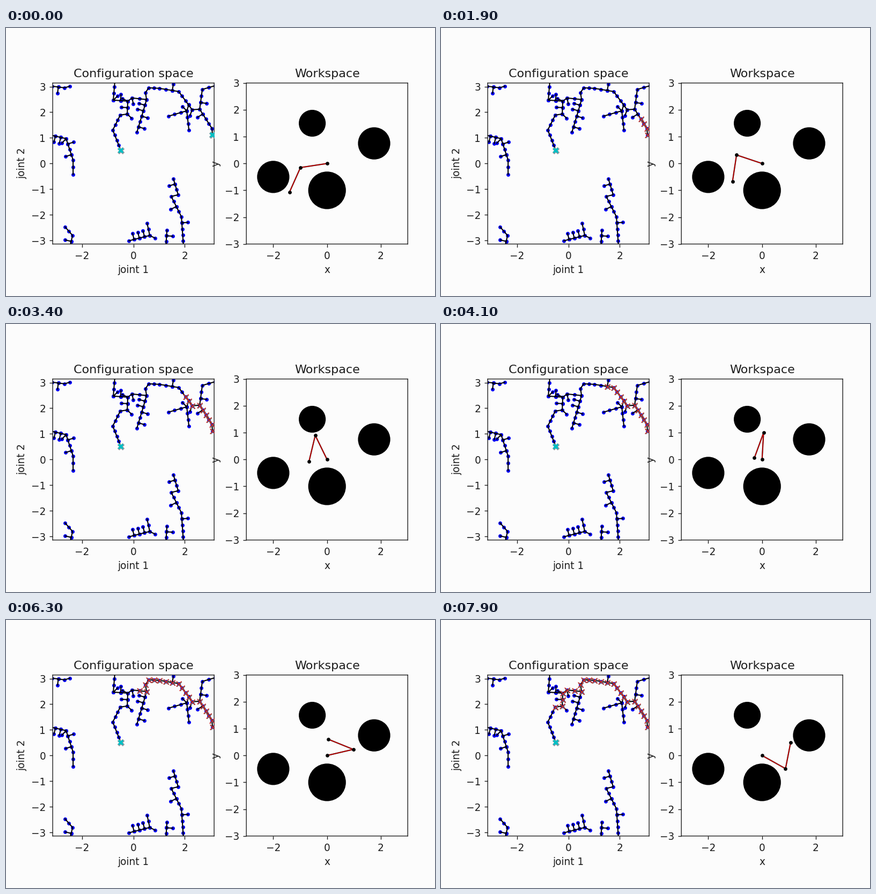
These frames come from a looping animation (800 px wide and 501 px high, 8 s). A matplotlib script:

```python
import numpy as np
import matplotlib.pyplot as plt
from matplotlib.animation import FuncAnimation

W, H, DPI = 800, 501, 100
K = 1.335                 # enlargement of the default plot style
SIDE = 301                # both panels are square
LEFT_X, RIGHT_X, TOP = 87.1, 448.2, 102.8
INTERVAL, FRAMES = 100, 80
START_MS, STEP_MS = 800, 300
STRIDE = 11.5             # usual spacing of tree nodes in pixels
REST = (-2.99, 1.0)       # arm angles before the run starts
INK, PAPER = "#1c1c1c", "#fcfcfc"

plt.rcParams.update({"font.family": "DejaVu Sans", "path.snap": False,
                     "axes.titlesize": 12 * K, "axes.titlepad": 6 * K,
                     "axes.labelsize": 10 * K, "axes.labelpad": 4 * K,
                     "axes.linewidth": 0.75 * K, "axes.edgecolor": INK,
                     "axes.labelcolor": INK, "text.color": INK})
for axis in ("xtick", "ytick"):
    plt.rcParams.update({axis + ".labelsize": 10 * K, axis + ".color": INK,
                         axis + ".major.size": 3.5 * K,
                         axis + ".major.pad": 3.5 * K,
                         axis + ".major.width": 0.75 * K})

# Corners of the limbs in stage pixels; the nodes between them are grown.
ROUTE = [(385, 200), (384, 188), (361, 152), (347, 153), (322, 119),
         (286, 113), (266, 112), (260, 121), (262, 134), (235, 131),
         (227, 137), (226, 161), (213, 163)]
GOAL_LIMB = [(213, 163), (199, 191), (214, 229)]
LIMBS = [
    [(86, 109), (109, 112), (119, 109)],
    [(203, 98), (200, 135), (227, 137)],
    [(262, 134), (256, 155), (244, 195)],
    [(341, 143), (337, 155), (303, 165)],
    [(337, 155), (341, 191)],
    [(361, 152), (366, 115), (390, 108)],
    [(82, 200), (112, 207), (125, 247), (125, 274)],
    [(110, 372), (124, 388), (119, 410)],
    [(229, 398), (268, 388), (263, 365)],
    [(300, 378), (298, 410)],
    [(312, 282), (321, 312), (308, 315), (327, 353), (331, 410)],
]
OBSTACLES = [(-0.55, 1.5, 0.5), (1.75, 0.75, 0.6), (-2, -0.5, 0.6), (0, -1, 0.7)]


def pt(px):
    return px * 72 / DPI


def grow(corners):
    """Fill a limb with evenly spaced nodes between its corners."""
    corners = np.array(corners, float)
    nodes = [corners[:1]]
    for a, b in zip(corners, corners[1:]):
        n = max(1, round(np.hypot(*(b - a)) / STRIDE))
        nodes.append(np.linspace(a, b, n + 1)[1:])
    return np.concatenate(nodes)


def twigs(nodes, odds):
    """Short side shoots, square to the limb, at random inner nodes."""
    for before, node, after in zip(nodes, nodes[1:], nodes[2:]):
        if rng.random() < odds:
            dx, dy = (after - before) / np.hypot(*(after - before))
            side = rng.choice([-1, 1])
            yield np.array([node, node + side * STRIDE * np.array([-dy, dx])])


def to_angles(p):
    scale = 2 * np.pi / SIDE
    return (p[:, 0] - 237.5) * scale, (253.5 - p[:, 1]) * scale


def draw_limb(nodes):
    xs, ys = to_angles(nodes)
    space.plot(xs, ys, "o", color="#0000f4", ms=pt(7), mew=0, zorder=2)
    space.plot(xs, ys, "-", color="black", lw=pt(2.1), zorder=3)


def panel(x, limit, title, xlabel, ylabel):
    ax = fig.add_axes([x / W, 1 - (TOP + SIDE) / H, SIDE / W, SIDE / H])
    ax.set(xlim=(-limit, limit), ylim=(-limit, limit), facecolor=PAPER,
           xticks=[-2, 0, 2], yticks=range(-3, 4),
           title=title, xlabel=xlabel, ylabel=ylabel)
    return ax


def crosses(color, size, width):
    return space.plot([], [], "x", color=color, ms=pt(size), mew=pt(width), zorder=4)[0]


fig = plt.figure(figsize=(W / DPI, H / DPI), dpi=DPI, facecolor=PAPER)
space = panel(LEFT_X, np.pi, "Configuration space", "joint 1", "joint 2")
work = panel(RIGHT_X, 3, "Workspace", "x", "y")

rng = np.random.default_rng(7)
route, goal_limb = grow(ROUTE), grow(GOAL_LIMB)
draw_limb(route)
draw_limb(goal_limb)
for twig in twigs(route, 0.3):
    draw_limb(twig)
for limb in map(grow, LIMBS):
    draw_limb(limb)
    for twig in twigs(limb, 0.5):
        draw_limb(twig)

for x, y, r in OBSTACLES:
    work.add_patch(plt.Circle((x, y), r, color="black", lw=0))

halo = crosses("#959ca2", 9.5, 5)
ends = crosses("#00bfc4", 8, 3.6)
trail = crosses("#777777", 9, 2.5)
trail_red = crosses("#e00000", 9.5, 1)

links, = work.plot([], [], "-", color="black", lw=pt(2.2), zorder=3)
links_red, = work.plot([], [], "-", color="#e80000", lw=pt(1.4), zorder=4)
joints, = work.plot([], [], "o", color="black", ms=pt(6.8), mew=0, zorder=5)

path_x, path_y = to_angles(route)
goal_x, goal_y = to_angles(goal_limb[-1:])


def update(i):
    step = (i * INTERVAL - START_MS) // STEP_MS
    running = step >= 0
    n = min(step + 1, len(route)) if running else 0

    for marks in (trail, trail_red):
        marks.set_data(path_x[:n], path_y[:n])
    for marks in (halo, ends):
        if running:
            marks.set_data(goal_x, goal_y)
        else:
            marks.set_data(np.append(goal_x, path_x[0]), np.append(goal_y, path_y[0]))

    a, b = (path_x[n - 1], path_y[n - 1]) if running else REST
    heading = np.array([a, a + b])
    xs = np.append(0, np.cumsum(np.cos(heading)))
    ys = np.append(0, np.cumsum(np.sin(heading)))
    for line in (links, links_red, joints):
        line.set_data(xs, ys)
    return halo, ends, trail, trail_red, links, links_red, joints


anim = FuncAnimation(fig, update, frames=FRAMES, interval=INTERVAL,
                     repeat=True, repeat_delay=0, blit=False)
plt.show()
```
